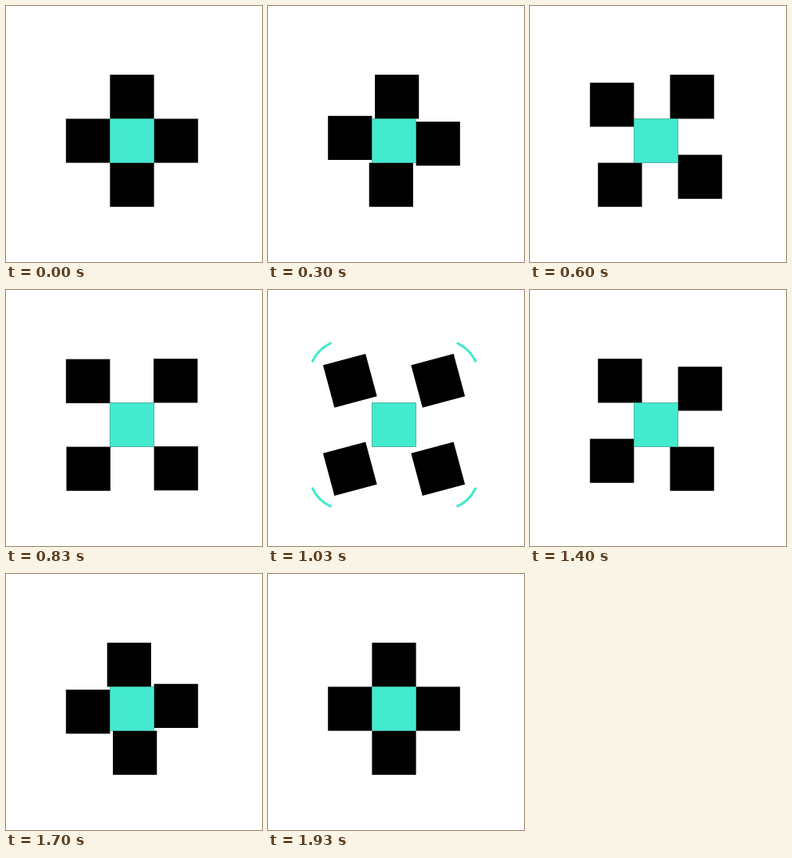
Recreate the animation shown at these times as an HTML page with a canvas. Size 321 by 321 pixels, loop 2060 ms.

```html
<!DOCTYPE html>
<html lang="en">
<head>
<meta charset="utf-8">
<title>Turning squares</title>
<style>
  html, body { margin: 0; width: 100%; height: 100%; overflow: hidden; background: #fff; }
  canvas { display: block; width: 321px; height: 321px; }
</style>
</head>
<body>
<canvas id="stage" width="321" height="321"></canvas>
<script>
const ctx = document.getElementById('stage').getContext('2d');
const LOOP = 2060;
const SIZE = 55.2;
const CX = 158, CY = 169;
const TEAL = '#43eace';

const clamp = v => Math.min(1, Math.max(0, v));
const span = (f, from, to) => clamp((f - from) / (to - from));
const smooth = t => t * t * (3 - 2 * t);

// cubic-bezier(.75, 0, .25, 1)
function ease(t) {
  let lo = 0, hi = 1;
  for (let i = 0; i < 24; i++) {
    const s = (lo + hi) / 2, r = 1 - s;
    const x = 2.25 * s * r * r + 0.75 * s * s * r + s * s * s;
    if (x < t) lo = s; else hi = s;
  }
  return smooth((lo + hi) / 2);
}

function square(x, y, angle, color) {
  ctx.save();
  ctx.translate(x, y);
  if (angle) ctx.rotate(angle);
  ctx.fillStyle = color;
  ctx.fillRect(-SIZE / 2, -SIZE / 2, SIZE, SIZE);
  ctx.restore();
}

// Trail outside each corner, running clockwise
function trail(i, head, tail) {
  const corner = Math.PI * (1 + i / 2);
  const pos = p => corner + (4 + 82 * p) * Math.PI / 180;
  const sx = i === 0 || i === 3 ? -1 : 1;
  const sy = i < 2 ? -1 : 1;
  ctx.beginPath();
  ctx.arc(CX + sx * 59.7, CY + sy * 59.7, 47, pos(tail), pos(head));
  ctx.stroke();
}

function draw(ms) {
  const f = Math.floor((ms + 5) * 0.03); // 30 steps a second
  const out = ease(span(f, 2, 28));
  const back = ease(span(f, 32, 58));
  const turn = ease(span(f, 26, 34)) % 1 * Math.PI / 2;
  const head = smooth(span(f, 27, 33));
  const tail = smooth(span(f, 29, 35));

  ctx.fillStyle = '#fff';
  ctx.fillRect(0, 0, 321, 321);

  let x = SIZE * out, y = SIZE * (back - 1);
  for (let i = 0; i < 4; i++) {
    square(CX + x, CY + y, turn, '#000');
    [x, y] = [-y, x];
  }
  square(CX, CY, 0, '#000');
  square(CX, CY, 0, TEAL);

  if (head > tail) {
    ctx.strokeStyle = TEAL;
    ctx.lineWidth = 3;
    ctx.lineCap = 'round';
    for (let i = 0; i < 4; i++) trail(i, head, tail);
  }
}

const start = performance.now();
function tick() {
  draw((performance.now() - start) % LOOP);
  requestAnimationFrame(tick);
}
tick();
</script>
</body>
</html>
```
